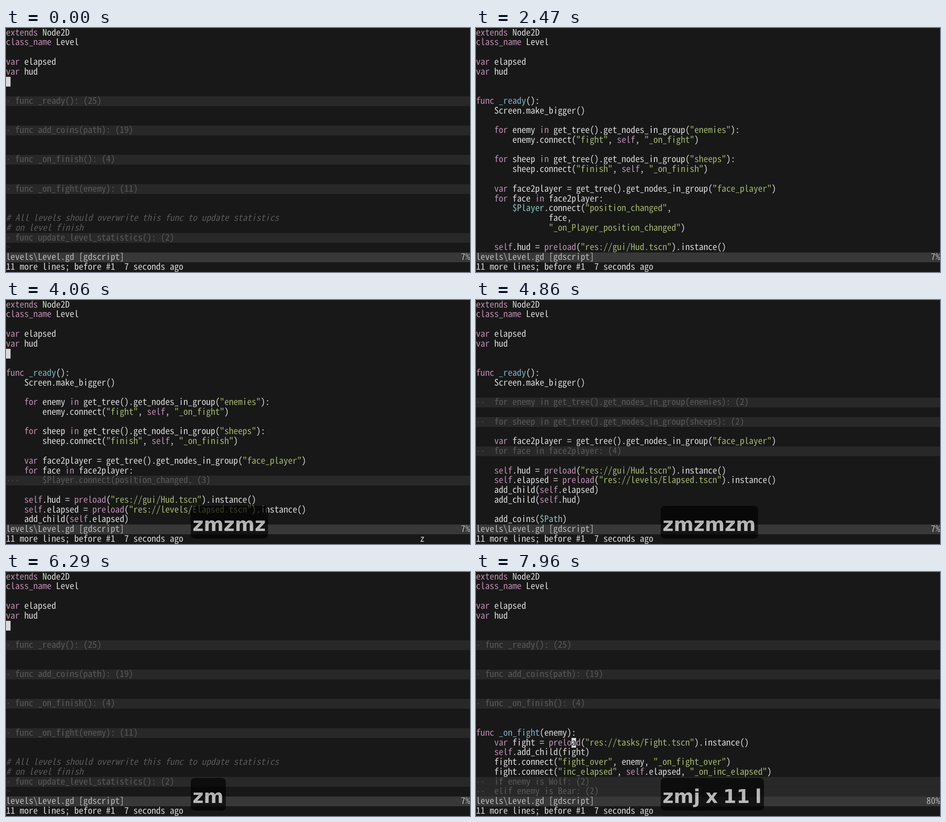
Recreate the animation shown at these times as an HTML page. Size 1030 by 544 pixels, loop 7990 ms.

```html
<!DOCTYPE html>
<html lang="en">
<head>
<meta charset="utf-8">
<title>Code folding</title>
<style>
  html, body { margin: 0; width: 100%; height: 100%; overflow: hidden; background: #181818; }
  svg { display: block; width: 100vw; height: 100vh; }
  text {
    white-space: pre;
    text-rendering: geometricPrecision;
    font-kerning: none;
    font-variant-ligatures: none;
  }
  #screen text { font-family: "Noto Sans Mono CJK JP", "Noto Sans Mono CJK SC", "Noto Sans Mono", monospace; }
  #screen .dots { font: 16.83px "Noto Sans Mono", monospace; }
  #screen .comment { font-style: italic; }
  #keys text { font: bold 42.5px "DejaVu Sans", sans-serif; word-spacing: -3px; }
</style>
</head>
<body>
<svg viewBox="0 0 1030 544" preserveAspectRatio="none">
  <rect width="1030" height="544" fill="#181818"/>
  <g id="screen"></g>
  <g id="keys">
    <rect x="410" y="459" height="73" rx="9" fill="#000"/>
    <text x="414" y="515" fill="#fff"></text>
  </g>
</svg>
<script>
const LOOP = 7990, COLS = 102, CELL_W = 1030 / COLS, CELL_H = 544 / 25, BASE = 16.6;
const STATUS_ROW = 23, MESSAGE_ROW = 24, SHOWCMD_COL = 91, TOTAL_LINES = 78;
const COLOR = {
  back: '#181818', text: '#d8d8d8', keyword: '#ba8baf', string: '#a1b56c', name: '#7cafc2',
  node: '#86c1b9', comment: '#585858', fold: '#585858', foldBack: '#282828',
  bar: '#383838', barText: '#b8b8b8', filler: '#383838'
};
const KEYWORDS = new Set('extends class_name var func for in if elif is self preload'.split(' '));

// Text buffer and its folded views
const foldLabel = (line, count, level) => {
  const indent = line.search(/\S/);
  const lead = '·'.repeat(level).padEnd(Math.max(indent, level + 1));
  return `${lead}${line.trim().replace(/"/g, '')} (${count})`;
};
const fold = (lines, at, count, level) =>
  [...lines.slice(0, at), foldLabel(lines[at], count, level), ...lines.slice(at + count)];

const HEAD = ['extends Node2D', 'class_name Level', '', 'var elapsed', 'var hud', '', ''];
const READY = `func _ready():
    Screen.make_bigger()

    for enemy in get_tree().get_nodes_in_group("enemies"):
        enemy.connect("fight", self, "_on_fight")

    for sheep in get_tree().get_nodes_in_group("sheeps"):
        sheep.connect("finish", self, "_on_finish")

    var face2player = get_tree().get_nodes_in_group("face_player")
    for face in face2player:
        $Player.connect("position_changed",
                face,
                "_on_Player_position_changed")

    self.hud = preload("res://gui/Hud.tscn").instance()
    self.elapsed = preload("res://levels/Elapsed.tscn").instance()
    add_child(self.elapsed)
    add_child(self.hud)

    add_coins($Path)`.split('\n');
const FIGHT = `func _on_fight(enemy):
    var fight = preload("res://tasks/Fight.tscn").instance()
    self.add_child(fight)
    fight.connect("fight_over", enemy, "_on_fight_over")
    fight.connect("inc_elapsed", self.elapsed, "_on_inc_elapsed")`.split('\n');

const open = [...HEAD, ...READY];
const closed = [
  ...HEAD,
  foldLabel('func _ready():', 25, 1), '', '',
  foldLabel('func add_coins(path):', 19, 1), '', '',
  foldLabel('func _on_finish():', 4, 1), '', '',
  foldLabel('func _on_fight(enemy):', 11, 1), '', '',
  '# All levels should overwrite this func to update statistics',
  '# on level finish',
  foldLabel('func update_level_statistics():', 2, 1),
  '~'
];
const VIEWS = {
  open,
  deep: fold(open, 18, 3, 3),
  mid: fold(fold(fold(open, 17, 4, 2), 13, 2, 2), 10, 2, 2),
  closed,
  fight: [
    ...closed.slice(0, 16), ...FIGHT,
    foldLabel('    if enemy is Wolf:', 2, 2),
    foldLabel('    elif enemy is Bear:', 2, 2)
  ]
};
// Buffer line under the cursor for each screen row from 5 on
const ROW_LINES = [6, 7, 8, 33, 34, 35, 54, 55, 56, 60, 61, 62, 63];

// Each key press changes part of the state
const jump = (time, row, keys) => [time, { row, keys }];
const EVENTS = [
  [-580, { view: 'closed', row: 5, col: 0, keys: '', cmd: '' }],
  [650, { keys: 'z', cmd: 'z' }],
  [1110, { keys: 'zR', cmd: '', view: 'open' }],
  [2680, { keys: 'z', cmd: 'z' }],
  [2790, { keys: 'zm', cmd: '' }],
  [3530, { keys: 'zmz', cmd: 'z' }],
  [3630, { keys: 'zmzm', cmd: '', view: 'deep' }],
  [4060, { keys: 'zmzmz', cmd: 'z' }],
  [4150, { keys: 'zmzmzm', cmd: '', view: 'mid' }],
  [4940, { keys: 'zmzmzmzm', view: 'closed' }],
  [6190, { keys: 'z', cmd: 'z' }],
  [6290, { keys: 'zm', cmd: '' }],
  jump(6560, 6, 'zmj'),
  jump(6860, 7, 'zmj x 2'),
  jump(6910, 9, 'zmj x 4'),
  jump(6950, 11, 'zmj x 6'),
  jump(7000, 12, 'zmj x 7'),
  jump(7040, 14, 'zmj x 9'),
  jump(7230, 15, 'zmj x 10'),
  jump(7310, 16, 'zmj x 10'),
  jump(7390, 16, 'zmj x 11'),
  [7630, { view: 'fight', col: 21 }],
  [7680, { keys: 'zmj x 11 l' }],
  [7960, { row: 17 }]
];

// Drawing
const screen = document.getElementById('screen');
const keys = document.getElementById('keys');
const [keyBox, keyText] = keys.children;

const pen = document.createElement('canvas').getContext('2d');
pen.font = '100px "Noto Sans Mono CJK JP", "Noto Sans Mono CJK SC", "Noto Sans Mono", monospace';
const fontSize = 100 * CELL_W / pen.measureText('M').width;

function add(tag, attrs, content) {
  const el = document.createElementNS('http://www.w3.org/2000/svg', tag);
  for (const name in attrs) el.setAttribute(name, attrs[name]);
  if (content) el.textContent = content;
  return screen.appendChild(el);
}
const write = (row, col, content, fill, cls = '') => add('text', {
  x: col * CELL_W, y: row * CELL_H + BASE, fill, class: cls, 'font-size': fontSize
}, content);
const band = (row, fill, col = 0, cols = COLS) => add('rect', {
  x: col * CELL_W, y: row * CELL_H, width: cols * CELL_W, height: CELL_H, fill
});

function tokenColor(token, previous) {
  if (token[0] === '"') return COLOR.string;
  if (token[0] === '$') return COLOR.node;
  if (previous === 'func') return COLOR.name;
  return KEYWORDS.has(token) ? COLOR.keyword : COLOR.text;
}

function drawLine(line, row) {
  if (line[0] === '·') {
    band(row, COLOR.foldBack);
    const [dots, gap] = line.match(/·+|\s+/g);
    [...dots].forEach((dot, i) => write(row, i, dot, COLOR.fold, 'dots'));
    const start = dots.length + gap.length;
    write(row, start, line.slice(start), COLOR.fold);
  } else if (line[0] === '#') {
    write(row, 0, line, COLOR.comment, 'comment');
  } else if (line === '~') {
    write(row, 0, line, COLOR.filler);
  } else {
    let previous = '';
    for (const match of line.matchAll(/"[^"]*"|\$\w+|\w+|[^\w\s"$]+/g)) {
      const token = match[0];
      write(row, match.index, token, tokenColor(token, previous));
      previous = token;
    }
  }
}

function drawScreen({ view, row, col, cmd }, cursorOn) {
  screen.replaceChildren();
  const lines = VIEWS[view].slice(0, STATUS_ROW);
  lines.forEach(drawLine);

  const percent = Math.floor(ROW_LINES[row - 5] / TOTAL_LINES * 100) + '%';
  band(STATUS_ROW, COLOR.bar);
  write(STATUS_ROW, 0, 'levels\\Level.gd [gdscript]', COLOR.barText);
  write(STATUS_ROW, COLS - percent.length, percent, COLOR.barText);
  write(MESSAGE_ROW, 0, '11 more lines; before #1  7 seconds ago', COLOR.text);
  if (cmd) write(MESSAGE_ROW, SHOWCMD_COL, cmd, COLOR.text);

  if (!cursorOn) return;
  band(row, COLOR.text, col, 1);
  const under = lines[row][col];
  if (under) write(row, col, under, COLOR.back, under === '·' ? 'dots' : '');
}

function drawKeys(label, alpha) {
  keys.setAttribute('opacity', label ? 0.66 * alpha : 0);
  if (keyText.textContent === label) return;
  keyText.textContent = label;
  keyBox.setAttribute('width', keyText.getComputedTextLength() + 9);
}

// Cursor blink: 710 ms wait, then 250 ms off and 400 ms on
const isCursorOn = idle => idle < 710 || (idle - 710) % 650 >= 250;
// The key display fades in four steps once typing has stopped
const keyAlpha = idle => idle < 940 ? 1 : Math.max(0, 0.75 - 0.25 * Math.floor((idle - 940) / 65));

let drawn = '';
function render(time) {
  const past = EVENTS.filter(([at]) => at <= time);
  const state = Object.assign({}, ...past.map(([, change]) => change));
  const idle = time - past[past.length - 1][0];
  const cursorOn = isCursorOn(idle);
  const look = [state.view, state.row, state.col, state.cmd, cursorOn].join();
  if (look !== drawn) {
    drawScreen(state, cursorOn);
    drawn = look;
  }
  drawKeys(state.keys, keyAlpha(idle));
}

const start = performance.now();
function tick() {
  render((performance.now() - start) % LOOP);
  requestAnimationFrame(tick);
}
tick();
</script>
</body>
</html>
```
